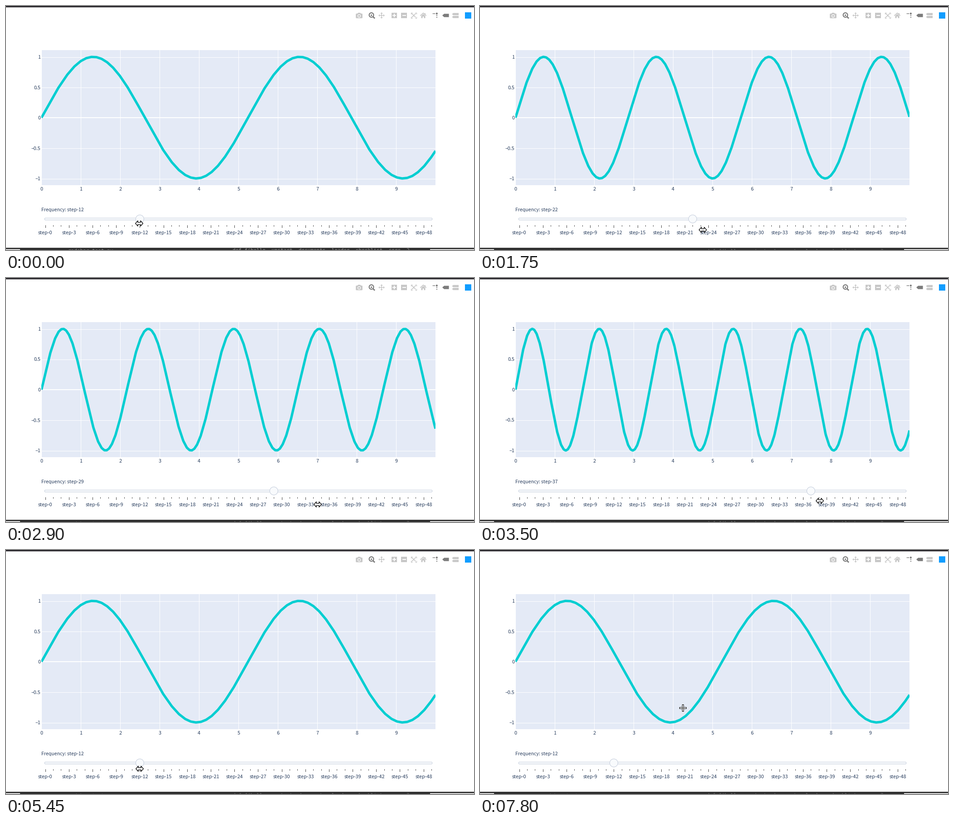
Recreate the animation shown at these times as a matplotlib script. Size 1033 by 542 pixels, loop 8 s.

```python
import math
import numpy as np
import matplotlib.pyplot as plt
from matplotlib.animation import FuncAnimation
from matplotlib.collections import LineCollection
from matplotlib.patches import Circle, FancyBboxPatch, Polygon, Rectangle

W, H, DPI = 1033, 542, 64
PT = 72 / DPI
TICK_MS, LOOP_MS = 50, 8000
LEFT, TOP, RIGHT, BOTTOM = 78.4, 98, 948, 398
X_UNIT = (RIGHT - LEFT) / 9.99
STEP_0, STEP_W = 87.0, 17.4
TEAL, INK, PALE, DARK = "#00CED1", "#2a3f5f", "#c7c7c7", "#7c7c7c"
PLOT_BG, RAIL_EDGE, RAIL_FILL = "#E4EAF6", "#bec8d9", "#f8fafc"

# Turning points of the pointer: time, x, y
PATH = np.array([
    (50, 294, 483), (350, 295, 477), (800, 295, 479), (1100, 369, 485),
    (2000, 539, 502), (2150, 490, 503), (2550, 446, 505), (2900, 688, 503),
    (3350, 750, 495), (4130, 342, 490), (4500, 150, 486), (4760, 125, 484),
    (5280, 295, 486), (6000, 295, 486), (6210, 297, 356), (6470, 267, 253),
    (6730, 287, 213), (7510, 329, 290), (7770, 448, 351),
])
# The screen refreshes fully in these spans, later only now and then
BURSTS = [(100, 350), (850, 1250), (1750, 2550), (2650, 3050)]
SPARSE_FROM, SPARSE_MS = 3350, 260
SLIDER_LAG = 150
HOVER_REACH = 12

plt.rcParams["font.family"] = ["Noto Sans CJK JP", "DejaVu Sans"]
fig = plt.figure(figsize=(W / DPI, H / DPI), dpi=DPI, facecolor="white")
ax = fig.add_axes([0, 0, 1, 1])
ax.set_xlim(0, W)
ax.set_ylim(H, 0)
ax.axis("off")


def rect(x, y, w, h, color, z=1):
    ax.add_patch(Rectangle((x, y), w, h, fc=color, ec="none", lw=0, zorder=z))


def poly(pts, color, z=3):
    ax.add_patch(Polygon(pts, fc=color, ec="none", zorder=z))


def stroke(xs, ys, color, lw, z=3):
    return ax.plot(xs, ys, color=color, lw=lw * PT, zorder=z,
                   solid_capstyle="butt", solid_joinstyle="miter")[0]


def text(x, y, s, ha="center", size=10.8, color=INK, z=4, **kw):
    return ax.text(x, y, s, ha=ha, va="baseline", fontsize=size * PT,
                   color=color, zorder=z, **kw)


def step_x(step):
    return STEP_0 + STEP_W * step


def draw_modebar():
    # camera
    ax.add_patch(FancyBboxPatch((773.5, 18), 12, 8, fc=PALE, ec=PALE, zorder=3,
                                boxstyle="round,pad=0.8,rounding_size=1.2"))
    poly([(775.5, 17.5), (777, 15), (782, 15), (783.5, 17.5)], PALE)
    ax.add_patch(Circle((779.5, 22), 3, fc=PALE, ec="white", lw=1.3 * PT, zorder=4))
    # zoom
    ax.add_patch(Circle((806.5, 20), 4.9, fc="white", ec=DARK, lw=2.2 * PT, zorder=3))
    rect(805, 19, 3, 3, DARK, 4)
    stroke([809.8, 814], [23.5, 27.6], DARK, 2.8)
    # pan
    stroke([823.5, 834.5], [21, 21], PALE, 1.5)
    stroke([829, 829], [15.5, 26.5], PALE, 1.5)
    for dx, dy in ((1, 0), (-1, 0), (0, 1), (0, -1)):
        tip, base = 7, 4
        poly([(829 + dx * tip, 21 + dy * tip),
              (829 + dx * base - dy * 2.7, 21 + dy * base - dx * 2.7),
              (829 + dx * base + dy * 2.7, 21 + dy * base + dx * 2.7)], PALE)
    # zoom in, zoom out
    for cx in (857, 878.5):
        rect(cx - 6.3, 14.8, 12.6, 12.6, PALE, 3)
        rect(cx - 4, 20.1, 8, 2, "white", 4)
    rect(856, 17.1, 2, 8, "white", 4)
    # autoscale
    for sx in (-1, 1):
        for sy in (-1, 1):
            stroke([900 + sx * 3, 900 + sx * 6.3, 900 + sx * 6.3],
                   [21 + sy * 6.3, 21 + sy * 6.3, 21 + sy * 3], PALE, 1.3)
            stroke([900, 900 + sx * 4.5], [21, 21 + sy * 4.5], PALE, 1.6)
    # home
    stroke([914.3, 921, 927.7], [21.6, 15.6, 21.6], PALE, 1.7)
    rect(924, 15.5, 1.8, 4, PALE, 3)
    poly([(916.5, 21.8), (921, 17.8), (925.5, 21.8), (925.5, 27), (922.4, 27),
          (922.4, 23.4), (919.6, 23.4), (919.6, 27), (916.5, 27)], PALE)
    # spike lines
    ax.add_patch(Circle((950.8, 16.8), 2.1, fc=DARK, ec="none", zorder=3))
    for d in (4.5, 8):
        rect(949.8 - d, 15.8, 2, 2, DARK, 3)
        rect(949.8, 15.8 + d, 2, 2, DARK, 3)
    # hover tags
    for x, y, h, color in ((963, 21, 7.4, DARK), (984.5, 18, 4.8, PALE),
                           (984.5, 24.4, 4.8, PALE)):
        poly([(x, y), (x + h * 0.55, y - h / 2), (x + 14.6, y - h / 2),
              (x + 14.6, y + h / 2), (x + h * 0.55, y + h / 2)], color)
    rect(1013, 14, 14, 14, "#119dff", 3)


def draw_static():
    rect(0, 0, W, 3, "#302e33")
    rect(0, 537, W, 3, "#333333")
    rect(0, 540, W, 2, "#dcdcdc")
    rect(31, 540, 905, 2, "#2b2b2b")
    rect(78, TOP, 870, BOTTOM - TOP, PLOT_BG)
    for v in range(10):
        x = LEFT + v * X_UNIT
        if v:
            rect(math.floor(x), TOP, 1, BOTTOM - TOP, "white")
        text(x - 0.3, 410, str(v))
    rect(77, TOP, 2, BOTTOM - TOP, "white")
    ax.add_patch(FancyBboxPatch((87, 472.8), 852, 0.8, fc=RAIL_FILL, ec=RAIL_EDGE,
                                lw=0.9 * PT, zorder=2,
                                boxstyle="round,pad=1.8,rounding_size=1.8"))
    for k in range(50):
        major = k % 3 == 0
        rect(math.floor(step_x(k)), 487, 1, 6 if major else 3, "#444444", 2)
        if major:
            text(step_x(k) - 0.2, 507, f"step-{k}")
    draw_modebar()


draw_static()

strip = [text(x, 0, s, "left", 11, "#8f8f8f", family="DejaVu Sans Mono")
         for x, s in ((137, "modebar_test.py"),
                      (500, "def f(hello, upstart, documents, loader, checklist, core, 2"))]

grid = LineCollection([], colors="white", zorder=1.2)
ax.add_collection(grid)
y_labels = [text(76.5, 0, "", "right") for _ in range(7)]
curve = stroke([], [], TEAL, 5.4, 2)
curve.set_solid_joinstyle("round")
curve.set_clip_path(Rectangle((78, TOP), 870, BOTTOM - TOP, transform=ax.transData))
title = text(78, 456.5, "", "left", 10.5)
grip = Circle((0, 473), 9, fc=RAIL_FILL, ec=RAIL_EDGE, lw=0.9 * PT, zorder=3)
ax.add_patch(grip)

spike_back = LineCollection([], colors=PLOT_BG, linewidths=4.5 * PT, zorder=5)
spikes = LineCollection([], colors=TEAL, linewidths=2.7 * PT,
                        linestyles=[(0, (3, 3))], zorder=5.1)
ax.add_collection(spike_back)
ax.add_collection(spikes)
bubble = Polygon([(0, 0), (1, 0), (1, 1)], fc=TEAL, ec="#444444", lw=0.9 * PT, zorder=6)
ax.add_patch(bubble)
tip_value = text(0, 0, "", "left", 11.5, "#444444", 7, family="Liberation Sans")
tip_name = text(0, 0, "\u03bd = 1.20000...", "left", 11.5, TEAL, 7,
                family="Liberation Sans")
hover_parts = [spike_back, spikes, bubble, tip_value, tip_name]

HALF = np.array([(-3, 6), (-8.3, 0), (-3, -6), (-3, -2.4)])
ARROW = np.vstack([HALF, -HALF, [(-3, 2.4)]])
ARROW = np.vstack([HALF, [(3, -2.4)], -HALF[:3], [(3, 2.4), (-3, 2.4)]])
resize = Polygon(ARROW, fc="white", ec="black", lw=1.3 * PT, joinstyle="round", zorder=9)
ax.add_patch(resize)
# Arm length and line of each layer of the crosshair
cross = [(8, stroke([], [], "black", 4, 9)), (7, stroke([], [], "white", 2, 9.1)),
         (1, stroke([], [], "black", 2, 9.2))]


def simplify(pts, tol=1.35):
    """Merge nearly straight runs of points into single segments."""
    out, start, i, n = [pts[0]], pts[0], 1, len(pts)
    while i < n:
        end = pts[i]
        dx, dy = end[0] - start[0], end[1] - start[1]
        r = math.hypot(dx, dy)
        lo = hi = 0
        i += 1
        while i < n:
            p = pts[i]
            dev = ((p[0] - start[0]) * dy - (p[1] - start[1]) * dx) / r
            lo, hi = min(lo, dev), max(hi, dev)
            if hi - lo > tol:
                break
            end = p
            i += 1
        out.append(end)
        if i < n:
            start = pts[i]
            out.append(start)
            i += 1
    return out


def show_wave(step):
    """Draw the sine with its auto-ranged y axis; return its pixel points."""
    x = np.arange(1000) * 0.01
    y = np.sin(step * 0.1 * x)
    lo, hi = y.min(), y.max()
    pad = (hi - lo) / 18
    low, span = lo - pad, hi - lo + 2 * pad

    def to_px(v):
        return BOTTOM - (v - low) / span * (BOTTOM - TOP)

    px, py = LEFT + x * X_UNIT, to_px(y)
    curve.set_data(*zip(*simplify(list(zip(px.tolist(), py.tolist())))))

    dtick = 0.5 if span > 1.86 else 0.2
    ticks = [round(k * dtick, 1) for k in range(math.ceil(low / dtick),
                                                math.floor((low + span) / dtick) + 1)]
    segs, widths = [], []
    for v in ticks:
        row = round(to_px(v)) if v == 0 else math.floor(to_px(v) + 0.01) + 1
        segs.append([(78, row), (RIGHT, row)])
        widths.append((2 if v == 0 else 1) * PT)
    grid.set_segments(segs)
    grid.set_linewidths(widths)
    for i, lab in enumerate(y_labels):
        lab.set_visible(i < len(ticks))
        if i < len(ticks):
            lab.set_text(f"{ticks[i] + 0.0:g}".replace("-", "\u2013"))
            lab.set_y(to_px(ticks[i]) + 4)
    return x, y, px, py


def show_hover(wave, mx, my):
    x, y, px, py = wave
    dist = np.hypot(px - mx, py - my)
    i = dist.argmin()
    near = my < BOTTOM and dist[i] < HOVER_REACH
    for part in hover_parts:
        part.set_visible(near)
    if not near:
        return
    cx, cy = px[i], py[i]
    segs = [[(LEFT, cy), (cx, cy)], [(cx, BOTTOM), (cx, cy)]]
    spike_back.set_segments(segs)
    spikes.set_segments(segs)
    tip_value.set_text(f"({x[i]:.3g}, {y[i]:.7g})".replace("-", "\u2212"))
    x0 = cx + 5.4
    tip_value.set_position((x0 + 3.5, cy + 4))
    x1 = x0 + 7 + tip_value.get_window_extent().width
    bubble.set_xy([(cx, cy), (x0, cy - 5.4), (x0, cy - 9.5), (x1, cy - 9.5),
                   (x1, cy + 9.5), (x0, cy + 9.5), (x0, cy + 5.4)])
    tip_name.set_position((x1 + 4, cy + 4))


def show_pointer(x, y):
    over_plot = y < BOTTOM
    resize.set_visible(not over_plot)
    resize.set_xy(ARROW + (x, y))
    for arm, line in cross:
        line.set_visible(over_plot)
        line.set_data([x - arm, x + arm, np.nan, x, x],
                      [y, y, np.nan, y - arm, y + arm])


def refresh_time(t):
    """Time of the latest screen refresh."""
    if t >= SPARSE_FROM:
        return t - (t - SPARSE_FROM) % SPARSE_MS
    return max([min(t, end) for start, end in BURSTS if t >= start], default=0)


def pointer_at(t):
    return [np.interp(t, PATH[:, 0], PATH[:, k]) for k in (1, 2)]


def update(frame):
    t = refresh_time(frame * TICK_MS)
    x, y = pointer_at(t)
    lag_x = pointer_at(min(t, PATH[13, 0]) - SLIDER_LAG)[0]
    step = round((lag_x - STEP_0) / STEP_W)

    wave = show_wave(step)
    show_hover(wave, x, y)
    show_pointer(x, y)
    title.set_text(f"Frequency: step-{step}")
    grip.center = (step_x(step) - 0.5, 473)

    early = t < 850
    for s in strip:
        s.set_y(546 if early else 548)
        s.set_color("#8f8f8f" if early else "#6a6a6a")
    return []


anim = FuncAnimation(fig, update, frames=LOOP_MS // TICK_MS, interval=TICK_MS,
                     repeat=True, repeat_delay=0, blit=False, cache_frame_data=False)
plt.show()
```
